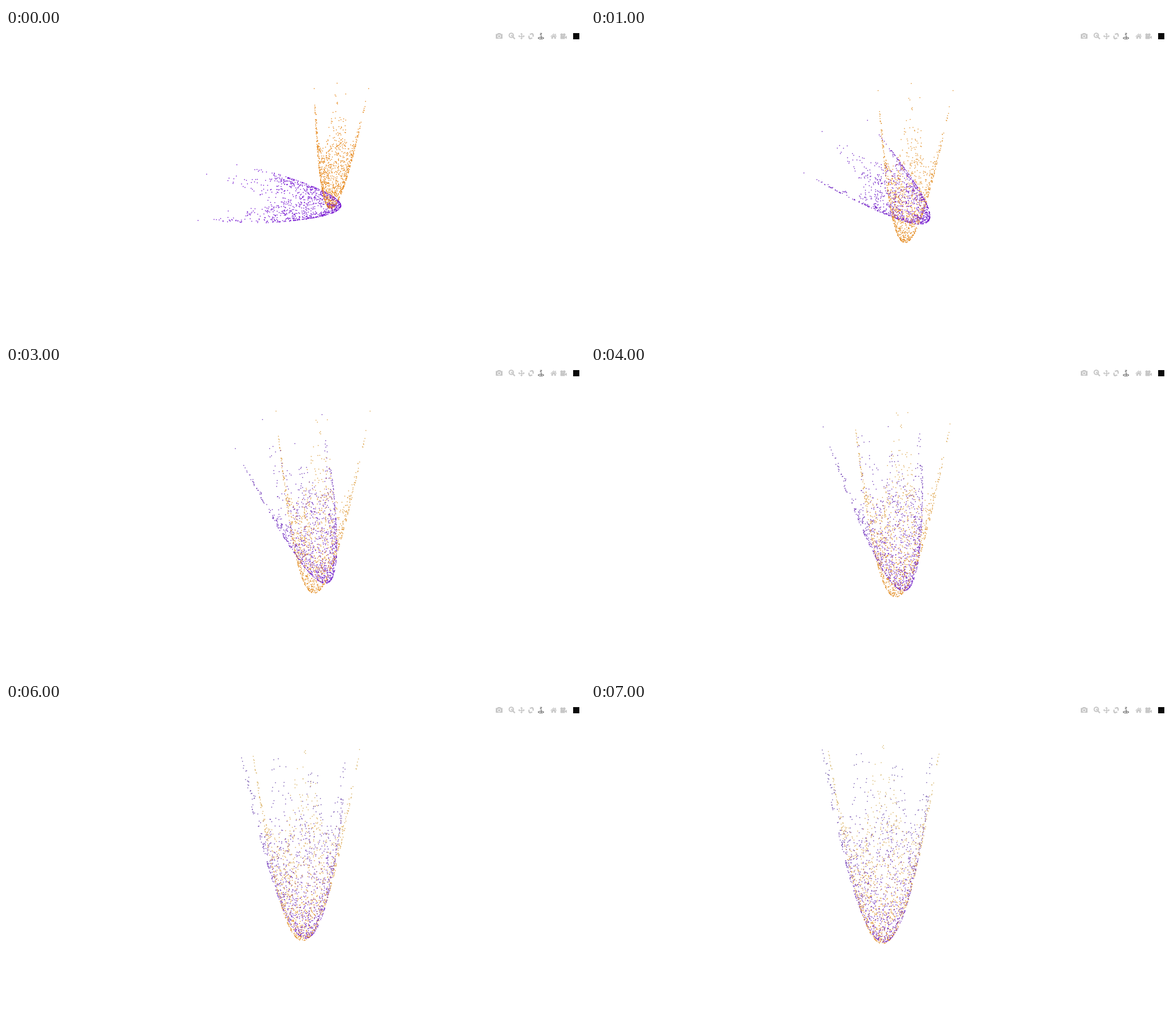
Recreate the animation shown at these times as a matplotlib script. Size 1025 by 547 pixels, loop 8000 ms.

```python
import numpy as np
import matplotlib.pyplot as plt
from matplotlib.animation import FuncAnimation
from matplotlib.patches import Arc, Circle, Ellipse, FancyBboxPatch, Polygon, Rectangle

W, H, DPI = 1025, 547, 100
PX = 72 / DPI            # points per pixel
STEPS = 8
TOP = 77                 # the scene hides everything above this row
COUNT = 1000
DEPTH = 0.07             # perspective growth with height
LIFT = 0.72              # centre of a bowl, as a share of its height axis
GREY, ACTIVE = "#c7c7c7", "#6a6a6a"

rng = np.random.default_rng(11)


def make_bowl():
    """Paraboloid over a square turned by 45 degrees, one tip per corner."""
    a, b = rng.uniform(-1, 1, (2, COUNT))
    keep = a * a + b * b < 1.75
    pts = np.column_stack([a + b, a - b])[keep] / np.sqrt(2)
    tip = np.sqrt(1.9)
    corners = tip * np.array([(-1, 0), (1, 0), (0, 1), (0, -1)])
    return np.vstack([pts, corners])


def height(pts):
    return (pts ** 2).sum(axis=1)[:, None]


def project(pts, center, wide, deep, tall):
    wide, deep, tall = map(np.array, (wide, deep, tall))
    h = height(pts)
    flat = pts[:, :1] * wide + pts[:, 1:] * deep + h * tall
    return center - LIFT * tall + flat / (1 - DEPTH * h)


def mix(a, b, t):
    return a + (b - a) * t


def growth(step):
    """The axes shrink towards the data, so the view grows, ever slower."""
    return (step / (STEPS - 1)) ** 0.6


def bowls(step):
    """Screen positions of the still bowl and of the one turning onto it."""
    t = step / (STEPS - 1)
    p = growth(step)
    smooth = t * t * (3 - 2 * t)
    settle = np.exp(-2 * step)           # centres meet in the first step
    tilt = np.exp(-0.55 * step)
    swing = (1 - np.exp(-0.25 * step)) / (1 - np.exp(-0.25 * (STEPS - 1)))
    tall = mix(97, 180, p)
    x = 546 - 0.65 * step ** 2

    still = project(
        fixed, np.array([x + 16 - 1.9 * step + 19 * settle, 298 - 48 * settle]),
        (mix(30.3, 67, p), 0), (-4.8, mix(-6, -12, p)),
        (mix(8.7, 1.3, t * t), -tall))
    turning = project(
        moving, np.array([x - 26 * settle, 297.5 + 11 * settle]),
        (mix(21.6, 65.9, p), mix(-31, -0.3, smooth)),
        (mix(-12, -22, p), mix(-20.5, -8.7, p)),
        (mix(-99, -5, swing), -tall * (1 - 0.88 * tilt)))
    return np.vstack([still, turning])


fig = plt.figure(figsize=(W / DPI, H / DPI), dpi=DPI, facecolor="white")
ax = fig.add_axes([0, 0, 1, 1])
ax.set_xlim(0, W)
ax.set_ylim(H, 0)
ax.axis("off")


def add(patch):
    ax.add_patch(patch)


def line(xs, ys, width=1.5, color=GREY):
    ax.plot(xs, ys, color=color, lw=width * PX, solid_capstyle="butt")


def poly(*xy, color=GREY):
    add(Polygon(xy, fc=color, lw=0))


def disc(x, y, r, color=GREY):
    add(Circle((x, y), r, fc=color, lw=0))


def box(x, y, w, h, r=1.0, color=GREY):
    add(FancyBboxPatch((x + r, y + r), w - 2 * r, h - 2 * r, fc=color, lw=0,
                       boxstyle=f"round,pad={r}"))


def camera(x, y):
    box(x - 6, y - 3.5, 12, 8.5)
    box(x - 2.8, y - 5, 5.6, 3, 0.8)
    disc(x, y + 0.7, 3.1, "white")
    disc(x, y + 0.7, 2)


def magnifier(x, y):
    add(Circle((x - 1, y - 1), 3.8, fill=False, ec=GREY, lw=1.9 * PX))
    line([x + 1.8, x + 5.4], [y + 1.8, y + 5.4], 2.3)
    line([x - 3, x + 1], [y - 1, y - 1], 1.1)
    line([x - 1, x - 1], [y - 3, y + 1], 1.1)


def pan(x, y):
    line([x - 4, x + 4], [y, y])
    line([x, x], [y - 4, y + 4])
    for s in (-1, 1):
        poly((x + 5.8 * s, y), (x + 3.2 * s, y - 2.4), (x + 3.2 * s, y + 2.4))
        poly((x, y + 5.8 * s), (x - 2.4, y + 3.2 * s), (x + 2.4, y + 3.2 * s))


def orbit(x, y):
    for start in (20, 200):
        add(Arc((x, y), 6.5, 9.5, angle=35, theta1=start, theta2=start + 140,
                ec=GREY, lw=2.2 * PX))
    for s in (-1, 1):
        poly((x + s * 0.4, y - s * 4.4), (x + s * 3.4, y - s * 5.4),
             (x + s * 3, y - s * 1.6))


def turntable(x, y):
    add(Ellipse((x, y + 3.4), 9.6, 3.2, fill=False, ec=ACTIVE, lw=1.1 * PX))
    line([x, x], [y - 2, y + 4], 1.2, ACTIVE)
    line([x - 1.6, x + 1.6, x - 1.6, x + 1.6],
         [y - 5.2, y - 5.2, y - 2.4, y - 2.4], 0.9, ACTIVE)


def home(x, y):
    poly((x - 5.6, y + 0.4), (x, y - 4.8), (x + 5.6, y + 0.4),
         (x + 4.8, y + 1.2), (x, y - 3.2), (x - 4.8, y + 1.2))
    poly((x - 4, y + 1.2), (x, y - 2.4), (x + 4, y + 1.2), (x + 4, y + 4.6),
         (x + 1.1, y + 4.6), (x + 1.1, y + 1.8), (x - 1.1, y + 1.8),
         (x - 1.1, y + 4.6), (x - 4, y + 4.6))
    poly((x + 2.6, y - 4.3), (x + 4, y - 4.3), (x + 4, y - 0.6), (x + 2.6, y - 2))


def film(x, y):
    disc(x - 3.3, y - 2.6, 2.4)
    disc(x + 1.2, y - 2.6, 2.4)
    box(x - 5.5, y - 0.6, 8, 5.6, 0.8)
    poly((x + 2.5, y + 1.2), (x + 5.8, y - 0.8), (x + 5.8, y + 4.8),
         (x + 2.5, y + 3))


camera(873, 14)
magnifier(895.5, 14)
pan(912.5, 14.5)
orbit(929.5, 14.5)
turntable(947, 14.5)
home(969.5, 14.5)
film(987, 14.5)
add(Rectangle((1003.5, 8.5), 11.5, 11.5, fc="#0a0a0a", lw=0))

fixed, moving = make_bowl(), make_bowl()


def per_point(first, second):
    """One colour for each point of both bowls."""
    rows = np.repeat([first, second], [len(fixed), len(moving)], axis=0)
    return rows / 255


vivid = per_point((232, 138, 30), (118, 22, 210))
pale = per_point((216, 186, 112), (112, 88, 168))
levels = height(np.vstack([fixed, moving]))
order = rng.permutation(len(levels))
dots = ax.scatter(np.zeros(len(order)), np.zeros(len(order)),
                  s=(1.65 * PX) ** 2, linewidths=0)


def draw(step):
    xy = bowls(step)
    xy[xy[:, 1] < TOP] = -50
    fade = growth(step) * np.clip(0.25 + 0.5 * levels, 0, 1)
    dots.set_offsets(xy[order])
    dots.set_facecolor(mix(vivid, pale, fade)[order])
    return dots,


anim = FuncAnimation(fig, draw, frames=STEPS, interval=1000, repeat=True,
                     repeat_delay=0, cache_frame_data=False)
plt.show()
```
